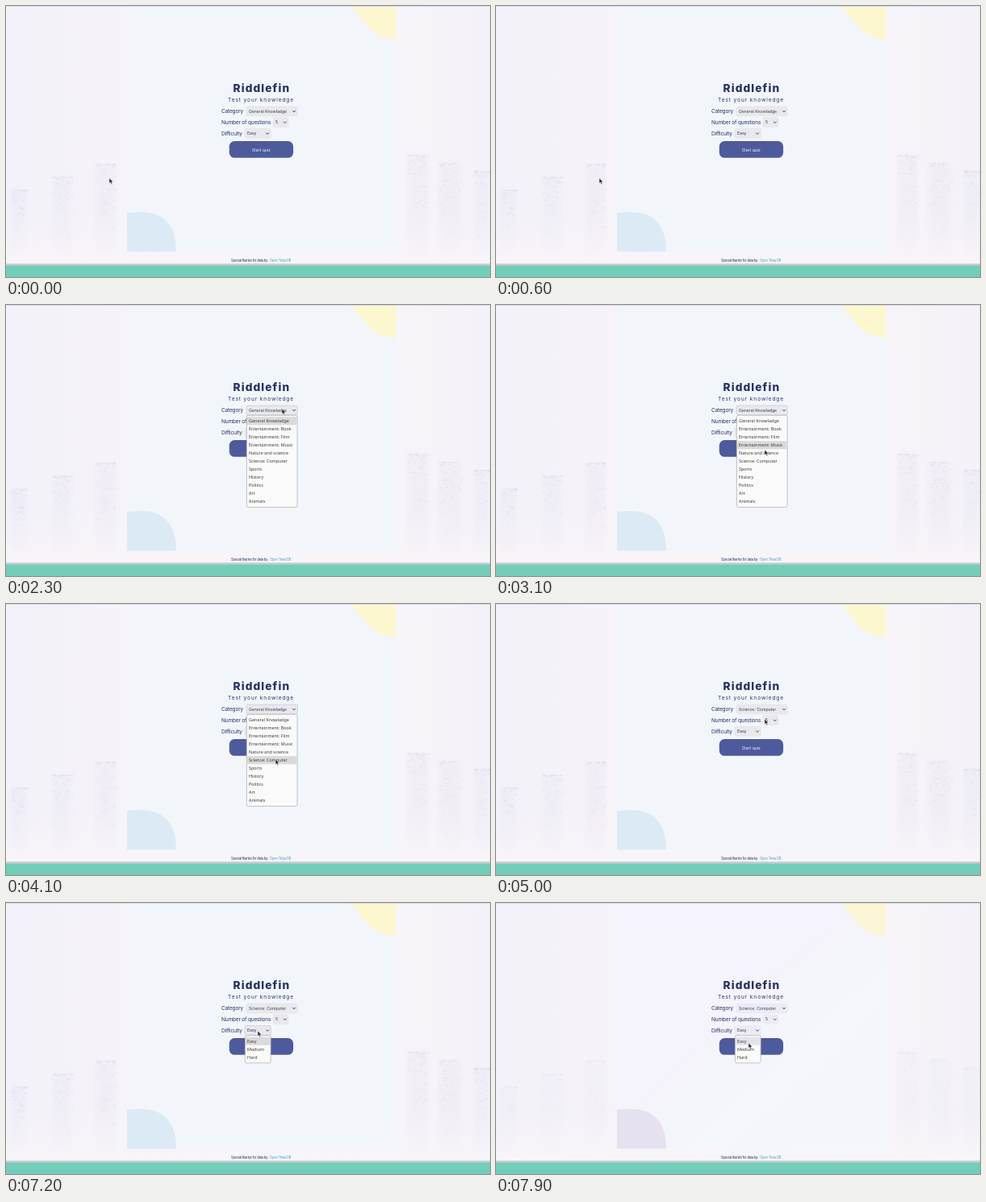
Recreate the animation shown at these times as an HTML page. Size 600 by 337 pixels, loop 8000 ms.

```html
<!DOCTYPE html>
<html lang="en">
<head>
<meta charset="utf-8">
<title>Quiz setup</title>
<style>
  html, body { margin: 0; width: 100%; height: 100%; overflow: hidden; background: #f5f3f9; }
  svg { display: block; width: 600px; height: 337px; }
  text { font-family: Inter, "Liberation Sans", sans-serif; fill: #2a3468; }
  .title { font-size: 13.7px; font-weight: 800; letter-spacing: 1.1px; fill: #293264; }
  .sub { font-size: 6.6px; letter-spacing: .9px; }
  .label { font-size: 6.6px; letter-spacing: -.22px; }
  .value { font-size: 5.2px; letter-spacing: -.05px; fill: #3a3c4c; }
  .start { font-size: 5.1px; fill: #f5f7fb; }
  .note { font-size: 4.2px; letter-spacing: -.24px; }
  .link { fill: #4a9fc8; }
  .select { fill: #e8e8ed; stroke: #dfdfe6; stroke-width: .5; }
  .open .select { stroke: #b4b6c4; }
  .chevron { fill: none; stroke: #34353f; stroke-width: .9; }
  .list { fill: #fafafa; stroke: #b3b3b8; stroke-width: .8; }
  .hover { fill: #dadada; }
  .item { font: 5.45px "Noto Sans", "Open Sans", sans-serif; fill: #3c3c3c; }
  .panel { fill: #f2f6fb; }
  .blob { fill: #dceaf5; }
  .sun { fill: #fdf7d0; }
  .soft .panel { fill: url(#softPanel); }
  .soft .blob { fill: #e5e1f1; }
  .soft .sun { fill: #fbf6d6; }
  .soft .city { opacity: .5; }
  .soft .select { fill: #ecebf4; stroke: #e8e6f2; }
  .soft .hover { fill: #e4e3ec; }
</style>
</head>
<body>
<svg id="stage" viewBox="0 0 600 337">
  <defs>
    <linearGradient id="page">
      <stop offset="0" stop-color="#f3f1f9"/>
      <stop offset=".25" stop-color="#f6f4f9"/>
      <stop offset=".8" stop-color="#f7f5f9"/>
      <stop offset="1" stop-color="#f4f2f8"/>
    </linearGradient>
    <linearGradient id="fade" x2="0" y2="1">
      <stop offset="0" stop-color="#f7f5f8" stop-opacity="0"/>
      <stop offset="1" stop-color="#f7f5f8"/>
    </linearGradient>
    <linearGradient id="softPanel" x2="1" y2="1">
      <stop offset=".4" stop-color="#f5f3fb"/>
      <stop offset=".7" stop-color="#f3f7fc"/>
    </linearGradient>
    <filter id="blur"><feGaussianBlur stdDeviation="2"/></filter>
  </defs>

  <rect width="600" height="337" fill="url(#page)"/>
  <g class="city" id="city"></g>
  <rect y="255" width="600" height="66" fill="url(#fade)"/>
  <rect width="600" height="1" fill="#dedce8"/>

  <rect class="panel" x="150" y="1" width="333.5" height="304.5"/>
  <path class="sun" d="M428 1C443 15 452 41 483.5 41V1Z"/>
  <path class="blob" d="M150 257C165 256 178 255 188 260C205 268 211 284 211 305.5H150Z"/>

  <rect y="320" width="600" height="1" fill="#dcdbe0"/>
  <rect y="321" width="600" height="2" fill="#bccbcc"/>
  <rect y="323" width="600" height="14" fill="#73cdb8"/>

  <text class="title" x="281.5" y="107">Riddlefin</text>
  <text class="sub" x="275" y="119">Test your knowledge</text>
  <rect x="276.8" y="168" width="79.3" height="20.8" rx="6.5" fill="#4d5a9c"/>
  <text class="start" x="304.8" y="180.5">Start quiz</text>
  <text class="note" x="279" y="318">Special thanks for data by:</text>
  <text class="note link" x="327" y="318">Open Trivia DB</text>

  <g id="fields"></g>
  <g id="lists"></g>
  <path id="cursor" fill="#26262c" stroke="#f4f4f4" stroke-width=".5"
        d="M0 0V6.6L1.5 5.3L2.6 7.8L3.7 7.3L2.7 4.9L4.7 4.8Z"/>
</svg>

<script>
const LOOP = 8000;
const TRAVEL = 600;      // longest pointer move
const HOVER_LAG = 120;
const SOFT_FROM = 7900;
const ROW = 10;
const $ = id => document.getElementById(id);
const clamp = (v, low, high) => Math.max(low, Math.min(high, v));

function add(parent, tag, attrs, text) {
  const node = document.createElementNS('http://www.w3.org/2000/svg', tag);
  for (const key in attrs) node.setAttribute(key, attrs[key]);
  if (text) node.textContent = text;
  return parent.appendChild(node);
}

let seed = 7;
const random = () => (seed = seed * 16807 % 2147483647) / 2147483647;

// A hazy tower with a bright roof line and windows thinning out below.
function tower(cx, roof) {
  const width = 20 + random() * 8;
  const x = cx - width / 2;
  add($('city'), 'rect', {
    x, y: roof, width, height: 310 - roof, fill: '#e3dff0', opacity: .25, filter: 'url(#blur)'
  });
  for (let i = 0; i < 45; i++)
    add($('city'), 'rect', {
      x: x + random() * width, y: roof + 90 * random() ** 3,
      width: 1.5 + random() * 2, height: 1.2, fill: '#cfcae4', opacity: .3
    });
}
for (let i = 0; i < 3; i++) tower(15 + i * 54, 228 - i * 16);
for (let i = 0; i < 3; i++) tower(510 + i * 40, 185 + i * 10);

const menus = [
  {
    label: 'Category', x: 298, w: 63.3, openAt: 1800, closeAt: 4300, pick: 5,
    items: ['General Knowladge', 'Entertainment: Book', 'Entertainment: Film',
      'Entertainment: Music', 'Nature and science', 'Science: Computer',
      'Sports', 'History', 'Politics', 'Art', 'Animals']
  },
  {
    label: 'Number of questions', x: 331, w: 19, openAt: 5400, closeAt: 6500, pick: 0,
    items: ['5', '10', '15', '20']
  },
  {
    label: 'Difficulty', x: 296, w: 32.3, openAt: 7200, closeAt: LOOP, pick: 0,
    items: ['Easy', 'Medium', 'Hard']
  }
];

menus.forEach((m, i) => {
  const { x, w, items } = m;
  const y = 125 + i * 13.75;
  m.top = y + 14.2;

  m.field = add($('fields'), 'g');
  add(m.field, 'text', { class: 'label', x: 267, y: y + 8.2 }, m.label);
  add(m.field, 'rect', { class: 'select', x, y, width: w, height: 11.8, rx: 2 });
  m.value = add(m.field, 'text', { class: 'value', x: x + 3, y: y + 7.7 });
  add(m.field, 'path', { class: 'chevron', d: `M${x + w - 6} ${y + 5}l1.8 1.9l1.8 -1.9` });

  m.list = add($('lists'), 'g');
  add(m.list, 'rect', {
    class: 'list', x: x + .4, y: m.top - 2, width: w - .6, height: items.length * ROW + 4.2, rx: 2
  });
  m.hover = add(m.list, 'rect', { class: 'hover', x: x + .9, width: w - 1.6, height: ROW });
  items.forEach((name, row) =>
    add(m.list, 'text', { class: 'item', x: x + 3, y: m.top + row * ROW + 6.8 }, name));
});

// Pointer stops: [arrival time, x, y]
const stops = [
  [0, 128, 214], [1300, 342, 129], [3100, 333, 180], [3700, 334, 193], [4900, 333, 143],
  [6000, 340, 181], [6200, 339, 157], [7100, 312, 159], [7800, 313, 174]
];

function pointer(t) {
  const next = stops.findIndex(([time]) => time > t);
  if (next < 1) return stops.at(next).slice(1);
  const [t0, x0, y0] = stops[next - 1];
  const [t1, x1, y1] = stops[next];
  const start = Math.max(t0, t1 - TRAVEL);
  const p = clamp((t - start) / (t1 - start), 0, 1);
  const ease = p * p * (3 - 2 * p);
  return [x0 + (x1 - x0) * ease, y0 + (y1 - y0) * ease];
}

function draw(t) {
  const [x, y] = pointer(t);
  const hoverY = pointer(t - HOVER_LAG)[1];
  $('cursor').setAttribute('transform', `translate(${x} ${y})`);
  $('stage').classList.toggle('soft', t >= SOFT_FROM);
  for (const m of menus) {
    const open = t >= m.openAt && t < m.closeAt;
    const row = clamp(Math.floor((hoverY - m.top) / ROW), 0, m.items.length - 1);
    m.list.style.display = open ? '' : 'none';
    m.field.classList.toggle('open', open);
    m.hover.setAttribute('y', m.top + ROW * row);
    m.value.textContent = m.items[t >= m.closeAt ? m.pick : 0];
  }
}

const begin = performance.now();
function tick() {
  draw((performance.now() - begin) % LOOP);
  requestAnimationFrame(tick);
}
tick();
</script>
</body>
</html>
```
